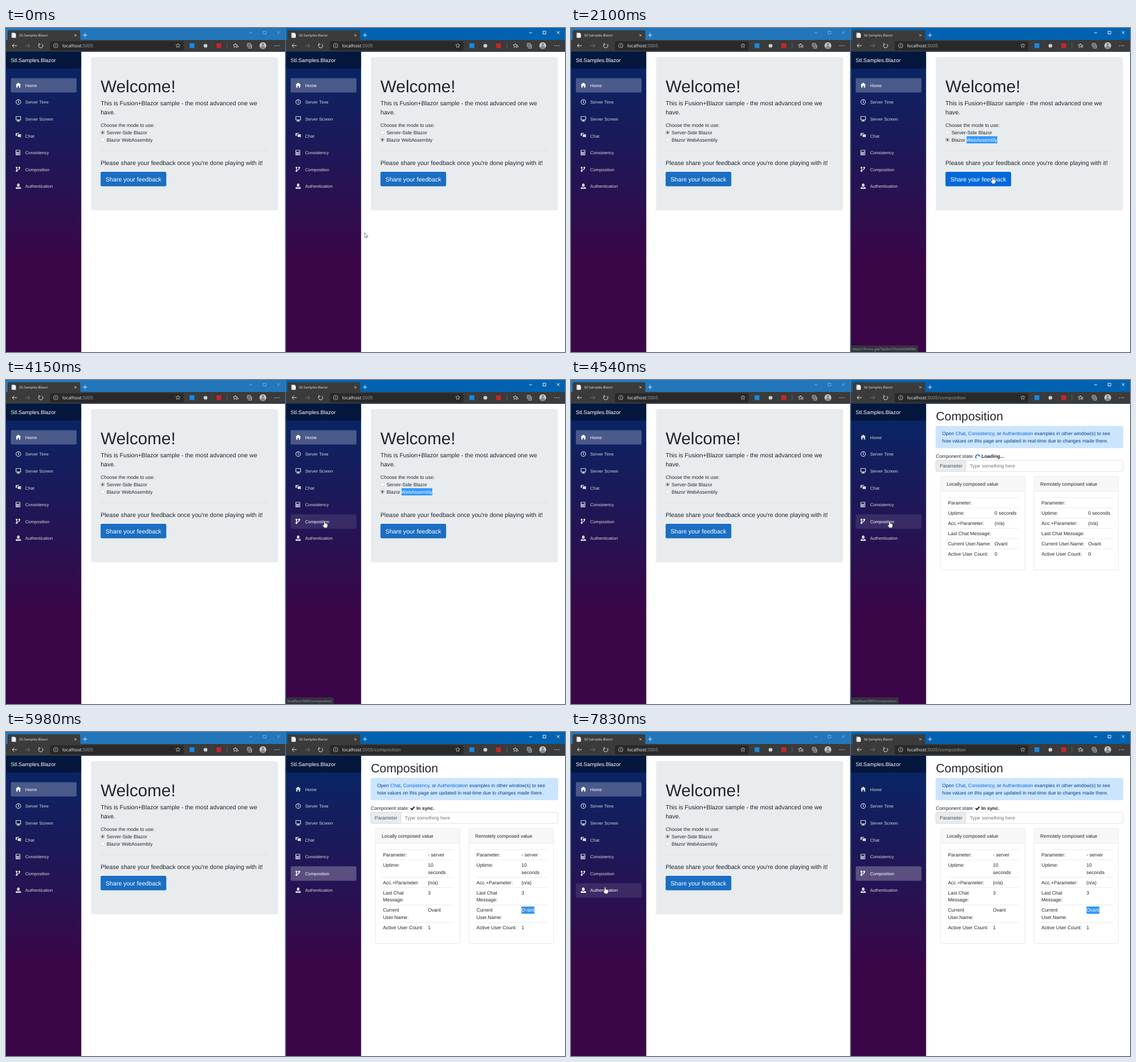
Write an HTML page that moves like this. It is 982 px wide and 570 px high and loops after 8000 ms.

```html
<!DOCTYPE html>
<html lang="en">
<head>
<meta charset="utf-8">
<title>Two windows</title>
<style>
html, body { margin: 0; width: 100%; height: 100%; overflow: hidden; background: #fff; }
svg { display: block; width: 982px; height: 570px; }
text { font-family: "Liberation Sans", Arial, sans-serif; text-rendering: geometricPrecision; white-space: pre; }
.ui { font-family: "Open Sans", "Noto Sans", sans-serif; }
.b { font-weight: bold; }
.link { fill: #0366d6; }
.invert { mix-blend-mode: difference; }
</style>
</head>
<body>
<svg id="stage" viewBox="0 0 982 570"></svg>
<script>
const LOOP = 8000, SHIFT = 491.6, INK = '#212529', SELECT = '#3297fd';
const ROW_TOP = 88.2, ROW_STEP = 29.62, ROW_H = 25.4;
const stage = document.getElementById('stage');

const text = (x, y, s, size = 8.5, fill = INK, cls = '') =>
  `<text x="${x}" y="${y}" font-size="${size}" fill="${fill}" class="${cls}">${s}</text>`;
const rect = (x, y, w, h, fill, r = 0, more = '') =>
  `<rect x="${x}" y="${y}" width="${w}" height="${h}" fill="${fill}" rx="${r}" ${more}/>`;
const line = (d, color, w = 1, more = '') =>
  `<path d="${d}" fill="none" stroke="${color}" stroke-width="${w}" ${more}/>`;
const dot = (x, y, r, fill, more = '') => `<circle cx="${x}" cy="${y}" r="${r}" fill="${fill}" ${more}/>`;
const group = (x, y, s, more = '') => `<g transform="translate(${x} ${y})" ${more}>${s}</g>`;
const span = (s, fill) => `<tspan fill="${fill}">${s}</tspan>`;
const link = s => `<tspan class="link">${s}</tspan>`;

// Sidebar entries: label and icon on an 8 x 8 grid in the current colour
const ring = 'fill="none" stroke="currentColor"';
const solid = d => `<path fill="currentColor" fill-rule="evenodd" d="${d}"/>`;
const NAV = [
  ['Home', solid('M4 0L0 3.5h1V7.5h2V5h2v2.5h2V3.5h1z')],
  ['Server Time', `<circle cx="4" cy="4" r="3.5" ${ring}/><path d="M4 2v2.2l1.1 1" ${ring}/>`],
  ['Server Screen', solid('M0 0h8v6H5v1h1.5v1h-5V7H3V6H0zM1 1v4h6V1z')],
  ['Chat', solid('M0 0v5l1-1h1V1h3V0zM3 2v4h4l1 1V2z')],
  ['Consistency', solid('M0 0h7v8H0zM1 1v2h5V1zM1 4v1h1V4zM3 4v1h1V4zM5 4v3h1V4zM1 6v1h1V6zM3 6v1h1V6z')],
  ['Composition', dot(1.5, 1.5, 1.5, 'currentColor') + dot(5.5, 1.5, 1.5, 'currentColor') +
    dot(1.5, 6.5, 1.5, 'currentColor') + `<path d="M1.5 2v4q0-1.4 1.4-1.4h1.4q1.2 0 1.2-1.3V2" ${ring}/>`],
  ['Authentication', solid('M4 0a2 2.5 0 0 1 0 5a2 2.5 0 0 1 0-5zM1.9 5Q4 7 6.1 5Q8 5.2 8 7v1H0V7Q0 5.2 1.9 5z')]
];

// Cursor stops: time, x, y
const STOPS = [
  [0, 630, 360], [200, 614.5, 346.5], [470, 622, 326], [670, 645, 278], [870, 690, 222],
  [1070, 722, 200], [1270, 722, 200], [1680, 735, 222], [1890, 742, 256], [2100, 740.5, 262],
  [2300, 705, 264], [2500, 648, 258], [2710, 598, 252], [2920, 582, 240], [3120, 572, 229],
  [3330, 566, 222], [3530, 562, 238], [3740, 560, 246], [3940, 559, 247.5], [4150, 559.5, 248],
  [4540, 559.5, 248], [4750, 559.5, 248], [4950, 598, 258], [5170, 720, 284], [5370, 850, 306],
  [5580, 913.5, 313.5], [5790, 913.5, 313.5], [5980, 913.5, 313.5], [6390, 868, 304], [6590, 430, 281],
  [6800, 226, 265], [7000, 98, 249], [7210, 84, 238], [7420, 74, 222], [7620, 66, 248], [7830, 60, 272.5]
];
const HOME_UNTIL = 4540, SYNC_AT = 4750, WORD_AT = 1270, NAME_AT = 5790;

const inside = (x, y, l, t, w, h) => x >= l && x <= l + w && y >= t && y <= t + h;

function hit([t, x, y]) {
  const side = x < SHIFT - 1 ? 0 : 1, lx = x - side * SHIFT, home = !side || t < HOME_UNTIL;
  const row = Math.floor((y - ROW_TOP) / ROW_STEP);
  const onRow = row >= 0 && row < NAV.length && inside(lx, y, 8.5, ROW_TOP + row * ROW_STEP, 115.5, ROW_H);
  return {
    side,
    row: onRow ? row : -1,
    button: home && inside(lx, y, 166.2, 253, 115.3, 25.6),
    words: side && (home ? inside(x, y, 668, 190, 82, 15) : inside(x, y, 905, 306, 24, 14))
  };
}

function chrome(active, path) {
  const pale = active ? '#fff' : '#7fb2dc', icon = '#e4e4e4';
  return rect(0, 0, 490.4, 42, active ? '#0063b1' : '#2277bb') +
    `<path d="M3 21.5V6q0-2 2-2H128.500q2 0 2 2V21.500z" fill="#3b3b3b"/>` +
    rect(0, 21, 490.4, 20.6, '#3b3b3b') +
    `<path d="M9.800 8.500h5.600l2 2v6.700h-7.600z" fill="#f2f5f8"/>` + line('M11.200 9v8', '#9fb4c8', .8) +
    text(23, 15, 'Stl.Samples.Blazor', 5.95, '#e8e8e8', 'ui') +
    line('M120 10.800l4 4m0-4l-4 4', '#ddd', .8) +
    line('M135.200 12.600h7.600m-3.800-3.800v7.600', '#e6f0f8', .9) +
    line('M427.500 8.500h5', pale, .9) + rect(451.800, 5.700, 4.800, 4.800, 'none', 0, `stroke="${pale}" stroke-width=".9"`) +
    line('M476 5.500l5 5m0-5l-5 5', pale, .9) +
    line('M19 31h-8m3.500-3.500l-3.500 3.500l3.500 3.500', icon, 1) +
    line('M34 31h8m-3.500-3.500l3.500 3.500l-3.500 3.500', '#777', 1) +
    line('M58.300 28.400a3.800 3.800 0 1 0 5.200-.2M58 26.600v2.300h2.400', icon, 1) +
    rect(77, 23.200, 235, 16.400, '#292929', 2) +
    dot(87.500, 31, 3.900, 'none', `stroke="#ccc" stroke-width=".8"`) + line('M87.500 30.300v2.800m0-4.500v.9', '#ccc', .9) +
    text(99, 34.200, 'localhost' + span(':5005' + path, '#a8a8a8'), 8, '#f4f4f4', 'ui') +
    star(302, 31, '#bbb') +
    rect(322.500, 26.800, 8.600, 8.600, '#1689e0') + dot(350.500, 31.200, 3.300, '#cfcfcf') + rect(369.500, 27, 8.600, 8.400, '#c22630', 1) +
    line('M388.500 26v10', '#666', .8) +
    star(403, 31, icon) + line('M406 31.500h2.500m-2.500 2h2.500', icon, .8) +
    rect(424, 27, 5.600, 6, 'none', 1, `stroke="${icon}" stroke-width=".9"`) + line('M426 35.300h5.500v-6', icon, .9) + line('M425.500 30h2.800m-1.400-1.400v2.800', icon, .7) +
    dot(451.300, 31, 6, '#c9c9c9') + dot(451.300, 29, 2.200, '#858585') + `<path d="M447 35q.5-3.500 4.300-3.500t4.300 3.500q-4.300 3.600-8.600 0z" fill="#858585"/>` +
    [472.500, 476, 479.500].map(x => dot(x, 31.200, .8, icon)).join('');
}

function star(x, y, color) {
  let d = '';
  for (let i = 0; i < 10; i++) {
    const a = i * Math.PI / 5, r = i % 2 ? 1.7 : 4;
    d += (i ? 'L' : 'M') + (x + r * Math.sin(a)).toFixed(2) + ' ' + (y - r * Math.cos(a)).toFixed(2);
  }
  return line(d + 'z', color, .8);
}

function sidebar(current, hover) {
  let out = rect(0, 41.5, 132.2, 528.5, 'url(#side)') + rect(0, 41.5, 132.2, 29.8, 'rgba(0,0,0,.4)') +
    text(8.5, 60, 'Stl.Samples.Blazor', 9.35, '#fff');
  NAV.forEach(([label, icon], i) => {
    const y = ROW_TOP + i * ROW_STEP, on = i === current, over = i === hover;
    const color = on || over ? '#fff' : '#d7d7d7';
    if (on || over) out += rect(8.5, y, 115.5, ROW_H, `rgba(255,255,255,${on ? .25 : .1})`, 2.1);
    out += group(17, y + 7.7, `<g transform="scale(1.17)">${icon}</g>`, `color="${color}"`) +
      text(33.8, y + 15.5, label, 7.65, color);
  });
  return out;
}

const radio = (y, on) =>
  dot(169.7, y, 3.3, '#fff', `stroke="${on ? '#8a8a8a' : '#c4c7ca'}" stroke-width=".7"`) + (on ? dot(169.7, y, 1.9, '#555') : '');

function home(mode, lit, picked) {
  return rect(149.4, 51.2, 328.6, 269.6, '#e9ecef', 2.6) +
    text(166.2, 112.8, 'Welcome!', 29.75) +
    text(166.2, 136.2, 'This is Fusion+Blazor sample - the most advanced one we', 10.62) +
    text(166.2, 152.1, 'have.', 10.62) +
    text(166.2, 174, 'Choose the mode to use:') +
    radio(183.8, mode === 0) + radio(196.6, mode === 1) +
    text(176.8, 186.8, 'Server-Side Blazor') +
    (picked ? rect(203.3, 190.4, 54, 12.6, SELECT) : '') +
    text(176.8, 199.6, 'Blazor ' + span('WebAssembly', picked ? '#fff' : INK)) +
    line('M166.200 216h295', '#d5d8dc', .7) +
    text(166.2, 240.6, 'Please share your feedback once you\'re done playing with it!', 10.62) +
    rect(166.2, 253, 115.4, 25.6, lit ? '#0069d9' : '#1b6ec2', 2.5) +
    text(175, 269.6, 'Share your feedback', 10.62, '#fff');
}

// Table rows: label lines and value lines
const LOADING = [
  [['Parameter:'], ['']], [['Uptime:'], ['0 seconds']], [['Acc.+Parameter:'], ['(n/a)']],
  [['Last Chat Message:'], ['']], [['Current User.Name:'], ['Ovant']], [['Active User Count:'], ['0']]
];
const SYNCED = [
  [['Parameter:'], ['- server']], [['Uptime:'], ['10', 'seconds']], [['Acc.+Parameter:'], ['(n/a)']],
  [['Last Chat', 'Message:'], ['3']], [['Current', 'User.Name:'], ['Ovant']], [['Active User Count:'], ['1']]
];

function card(x, title, synced, picked) {
  const valueX = synced ? 92.2 : 95.1;
  let y = 207, rows = '';
  for (const [label, value] of synced ? SYNCED : LOADING) {
    const mark = picked && value[0] === 'Ovant';
    rows += line(`M10.500 ${y}h127`, '#dee2e6', .7);
    if (mark) rows += rect(valueX, y + 2.6, 22.8, 12.8, SELECT);
    label.forEach((s, i) => rows += text(13.2, y + 11.9 + i * 12.7, s));
    value.forEach((s, i) => rows += text(valueX, y + 11.9 + i * 12.7, s, 8.5, mark ? '#fff' : INK));
    y += 18 + 12.7 * (Math.max(label.length, value.length) - 1);
  }
  const edge = 'stroke="#dfdfdf" stroke-width=".7"', h = y + 19 - 169.6;
  return group(x, 0, rect(0, 169.6, 148.4, h, '#fff', 2.1, edge) +
    rect(.3, 169.9, 147.800, 26, '#f7f7f7', 2) + line('M0 196h148.400', '#dfdfdf', .7) +
    text(11, 185.9, title) + rows);
}

function composition(synced, picked) {
  const edge = 'stroke="#ced4da" stroke-width=".7"', blue = '#004085';
  return text(149.4, 71, 'Composition', 21.25) +
    rect(149.4, 81.2, 328.5, 38.4, '#cce5ff', 2.1, 'stroke="#b8daff" stroke-width=".6"') +
    text(160.4, 96.9, `Open ${link('Chat')}, ${link('Consistency')}, or ${link('Authentication')} examples in other window(s) to see`, 8.5, blue) +
    text(160.4, 109.5, 'how values on this page are updated in real-time due to changes made there.', 8.5, blue) +
    text(149.4, 137.4, 'Component state:') +
    (synced ? line('M219.200 134l2.400 2.500l4.300-5', INK, 2)
      : line('M220.600 138.100a3.700 3.700 0 1 1 6-3.200', '#0b76d1', 1.6)) +
    text(229.4, 137.4, synced ? 'In sync.' : 'Loading...', 8.5, INK, 'b') +
    rect(149.4, 141.2, 328.5, 19.6, '#fff', 2.1, edge) +
    rect(149.4, 141.2, 53, 19.6, '#e9ecef', 2.1, edge) +
    text(156.2, 154, 'Parameter', 8.5, '#495057') +
    text(209, 154, 'Type something here', 8.5, '#6c757d') +
    card(157.4, 'Locally composed value', synced) +
    card(321.7, 'Remotely composed value', synced, picked);
}

function bubble(s) {
  const w = s.startsWith('https') ? 117.5 : 14 + (s.length - 3) * 3.02;
  return rect(0, 559, w, 12, '#30323a', 1.5, 'stroke="#484a52" stroke-width=".6"') +
    text(2.6, 567.2, s, 6.05, '#a6a8ad', 'ui');
}

function cursor(x, y, { row, button, words }) {
  if (words) return group(x, y, line('M-1.500-4.500h3M0-4.500v9M-1.500 4.500h3', '#fff', .8), 'class="invert"');
  const shape = row >= 0 || button
    ? 'M-1 1Q0-.6 1 1V4.500Q2.200 3.600 2.800 4.900Q4 4.200 4.400 5.500Q5.600 5.200 5.600 6.600Q5.600 10 4.200 12H-.6Q-2 9.400-3.400 7.400Q-3-.0-1 7.600z'
      .replace('Q-3-.0-1 7.600', 'Q-2.600 5.800-1 7.600')
    : 'M0 0V8.600L2 6.800L3.300 9.800L4.600 9.200L3.300 6.300H6z';
  return group(x, y, `<path d="${shape}" fill="#fff" stroke="#333" stroke-width=".6"/>`);
}

// Status line keeps the last hovered address until it is cleared
function statusAt(i) {
  let s = '';
  for (const stop of STOPS.slice(0, i + 1)) {
    const h = hit(stop);
    if (stop[0] === NAME_AT) s = '';
    if (!h.side) continue;
    if (h.row >= 0) s = 'localhost:5005/' + NAV[h.row][0].toLowerCase();
    else if (h.button) s = 'https://forms.gle/TpGkmTZttukhDMRB6';
  }
  return s;
}

function draw(i) {
  const [t, x, y] = STOPS[i], now = hit(STOPS[i]), before = hit(STOPS[Math.max(0, i - 1)]);
  const lit = side => [now, before].some(h => h.button && h.side === side);
  const over = side => now.side === side ? now.row : -1;
  const atHome = t < HOME_UNTIL, synced = t >= SYNC_AT, status = statusAt(i);
  const right = chrome(true, atHome ? '' : '/composition') +
    sidebar(atHome ? 0 : synced ? 5 : -1, over(1)) +
    (atHome ? home(1, lit(1), t >= WORD_AT) : composition(synced, t >= NAME_AT)) +
    (status ? bubble(status) : '');
  stage.innerHTML =
    `<defs><linearGradient id="side" gradientUnits="userSpaceOnUse" x1="0" y1="41.500" x2="0" y2="411.500">
      <stop stop-color="#052767"/><stop offset="1" stop-color="#3a0647"/></linearGradient></defs>` +
    rect(0, 0, 982, 570, '#fff') +
    chrome(false, '') + sidebar(0, over(0)) + home(0, lit(0), false) +
    group(SHIFT, 0, right) +
    rect(490.3, 0, 1.3, 570, '#2d4a63') +
    cursor(x, y, now);
}

const start = performance.now();
let shown = -1;
function tick() {
  const t = (performance.now() - start) % LOOP;
  const i = STOPS.filter(s => s[0] <= t).length - 1;
  if (i !== shown) draw(shown = i);
  requestAnimationFrame(tick);
}
tick();
</script>
</body>
</html>
```
